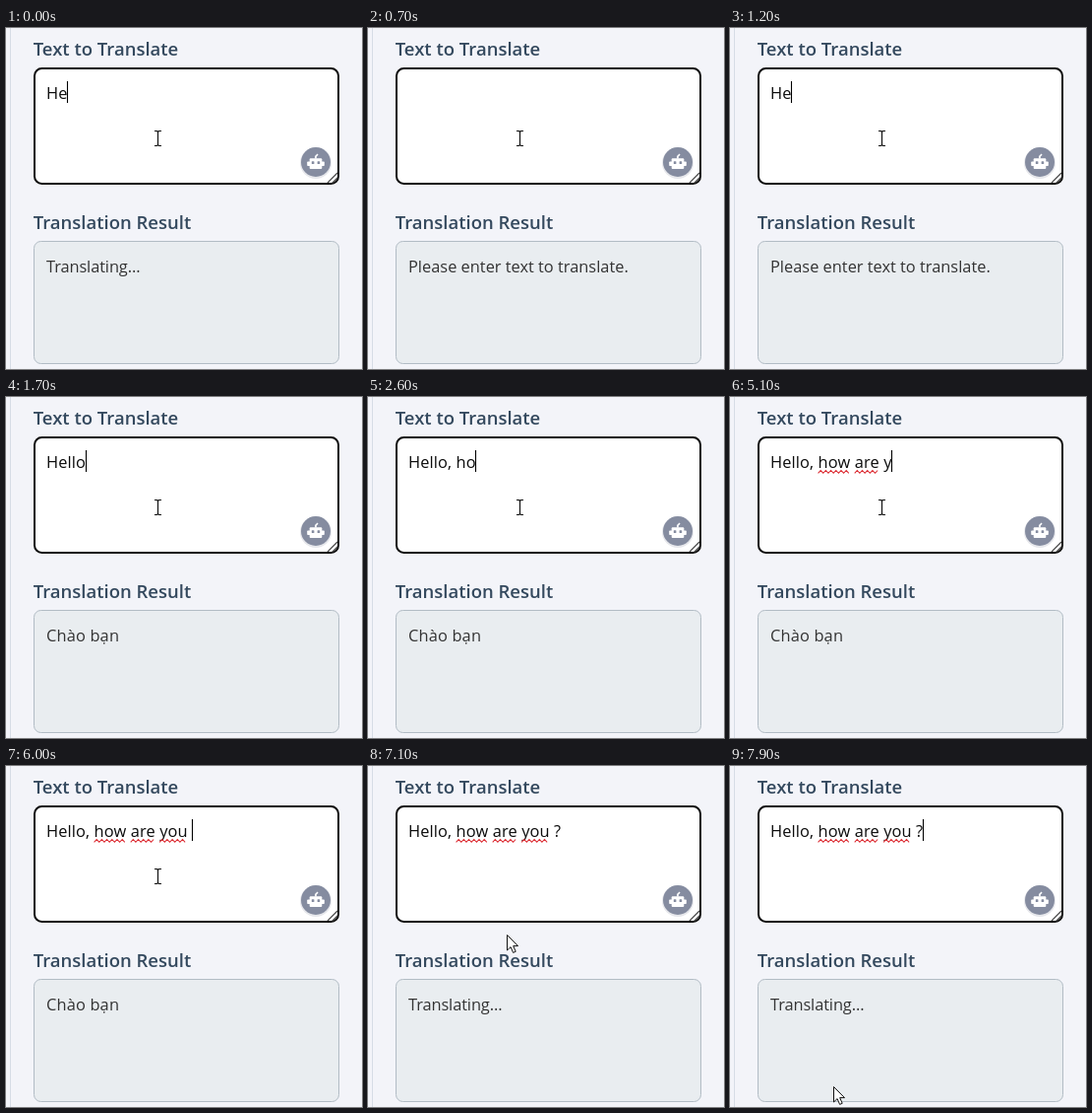
Animation of 362x346 px, one loop 8000 ms. Source, as an HTML page:

```html
<!DOCTYPE html>
<html lang="en">
<head>
<meta charset="utf-8">
<title>Live translation</title>
<style>
  html, body { margin: 0; width: 100%; height: 100%; overflow: hidden; background: #f3f4f9; }
  svg { display: block; width: 100%; height: 100%; }
  text { font: 16.4px "Open Sans", "Noto Sans", sans-serif; white-space: pre; }
  .label { font-size: 18.5px; font-weight: 600; fill: #34495e; }
  #typed { fill: #0c0c0c; letter-spacing: .12px; }
  #result { fill: #333; }
  .squiggle { fill: none; stroke: #dc2b32; stroke-width: 1.1; }
</style>
</head>
<body>
<svg viewBox="0 0 362 346">
  <rect width="362" height="346" fill="#f3f4f9"/>
  <path d="M4.5 0V346" stroke="#d6dce6"/>

  <text class="label" x="27.7" y="28">Text to Translate</text>
  <rect x="29" y="41" width="309" height="117" rx="7.5" fill="#fff" stroke="#0d0d0d" stroke-width="2"/>
  <path d="M327 157L337 147M332 157L337 152" stroke="#444" stroke-width="1.1"/>

  <g transform="translate(315 136)">
    <circle cy="1" r="16" fill="#858ca0" opacity=".2"/>
    <circle r="15" fill="#858ca0"/>
    <g fill="#fff">
      <path d="M-1 -3.5V-6L1.6 -8.4L2.6 -7.2L.8 -5.4V-3.5Z"/>
      <rect x="-6.3" y="-3.8" width="12.6" height="10.8" rx="1"/>
      <rect x="-8.8" y="-.5" width="17.6" height="4.6" rx=".8"/>
    </g>
    <g fill="#858ca0">
      <rect x="-4.2" y="-.8" width="2.6" height="2.8" rx=".6"/>
      <rect x="1.6" y="-.8" width="2.6" height="2.8" rx=".6"/>
    </g>
  </g>

  <text id="typed" x="41" y="72"></text>
  <g id="squiggles"></g>
  <path id="caret" stroke="#000" stroke-width="1.1"/>

  <text class="label" x="27.7" y="204">Translation Result</text>
  <rect x="28.5" y="216.5" width="310" height="124" rx="7" fill="#e9edf0" stroke="#b2bcc5"/>
  <text id="result" x="41" y="248"></text>

  <path id="beam" d="M151 104.5H153.5L154.5 105.5L155.5 104.5H158M154.5 105.5V118.5M151 119.5H153.5L154.5 118.5L155.5 119.5H158" fill="none" stroke="#111" stroke-width="1.2"/>
  <path id="arrow" d="M.5 .5V16L4.1 12.6L6.6 18.4L9.2 17.3L6.7 11.6H11.5Z" fill="#fff" stroke="#111" stroke-linejoin="round"/>
</svg>
<script>
const LOOP = 8000, TICK = 100, BLINK = 505;
const LEFT = 41, SPACING = 0.12;
const SENTENCE = "Hello, how are you ?";

// [time, number of characters in the field]
const keys = [
  [0, 2], [100, 1], [200, 0], [1000, 1], [1200, 2], [1300, 3], [1500, 4],
  [1700, 5], [1900, 6], [2100, 7], [2400, 8], [2600, 9], [2800, 10],
  [3700, 11], [3900, 12], [4200, 13], [4400, 14], [4800, 15], [5100, 16],
  [5300, 17], [5500, 18], [5800, 19], [6400, 20]
];
const results = [
  [0, "Translating...", -0.1],
  [400, "Please enter text to translate.", 0],
  [1700, "Chào bạn", 0.15],
  [6400, "Translating...", -0.1]
];
// [time shown, first character, end]
const marks = [[3800, 7, 10], [4900, 11, 14], [5900, 15, 18]];

const $ = id => document.getElementById(id);
const typed = $("typed"), result = $("result"), caret = $("caret");
const beam = $("beam"), arrow = $("arrow");
const pen = document.createElement("canvas").getContext("2d");
pen.font = getComputedStyle(typed).font;

const charX = n => LEFT + pen.measureText(SENTENCE.slice(0, n)).width + n * SPACING;
const latest = (list, t) => list.filter(item => item[0] <= t).pop();
const show = (el, on) => el.setAttribute("visibility", on ? "visible" : "hidden");

function squiggle(from, to) {
  let d = "";
  for (let x = from, i = 0; x <= to; x += 2.6, i++) d += `${i ? "L" : "M"}${x} ${i % 2 ? 74.5 : 77.3}`;
  const path = document.createElementNS("http://www.w3.org/2000/svg", "path");
  path.setAttribute("class", "squiggle");
  path.setAttribute("d", d);
  return $("squiggles").appendChild(path);
}
const lines = marks.map(([, a, b]) => squiggle(charX(a), charX(b)));

function draw(time) {
  const t = Math.floor(time / TICK) * TICK;

  const [pressed, count] = latest(keys, t);
  typed.textContent = SENTENCE.slice(0, count);
  const x = Math.floor(charX(count)) + 0.5;
  caret.setAttribute("d", `M${x} 54V76`);
  show(caret, Math.floor((t - pressed + 10) / BLINK) % 2 === 0);
  lines.forEach((line, i) => show(line, t >= marks[i][0]));

  const [, message, spacing] = latest(results, t);
  result.textContent = message;
  result.style.letterSpacing = spacing + "px";

  const moving = t >= 7100;
  show(beam, !moving);
  show(arrow, moving);
  const p = Math.max(0, (t - 7100) / 800);
  const k = p * p * (3 - 2 * p);
  arrow.setAttribute("transform", `translate(${Math.round(141 - 36 * k)} ${Math.round(171 + 154 * k)})`);
}

const start = performance.now();
function frame() {
  draw((performance.now() - start) % LOOP);
  requestAnimationFrame(frame);
}
frame();
</script>
</body>
</html>
```
